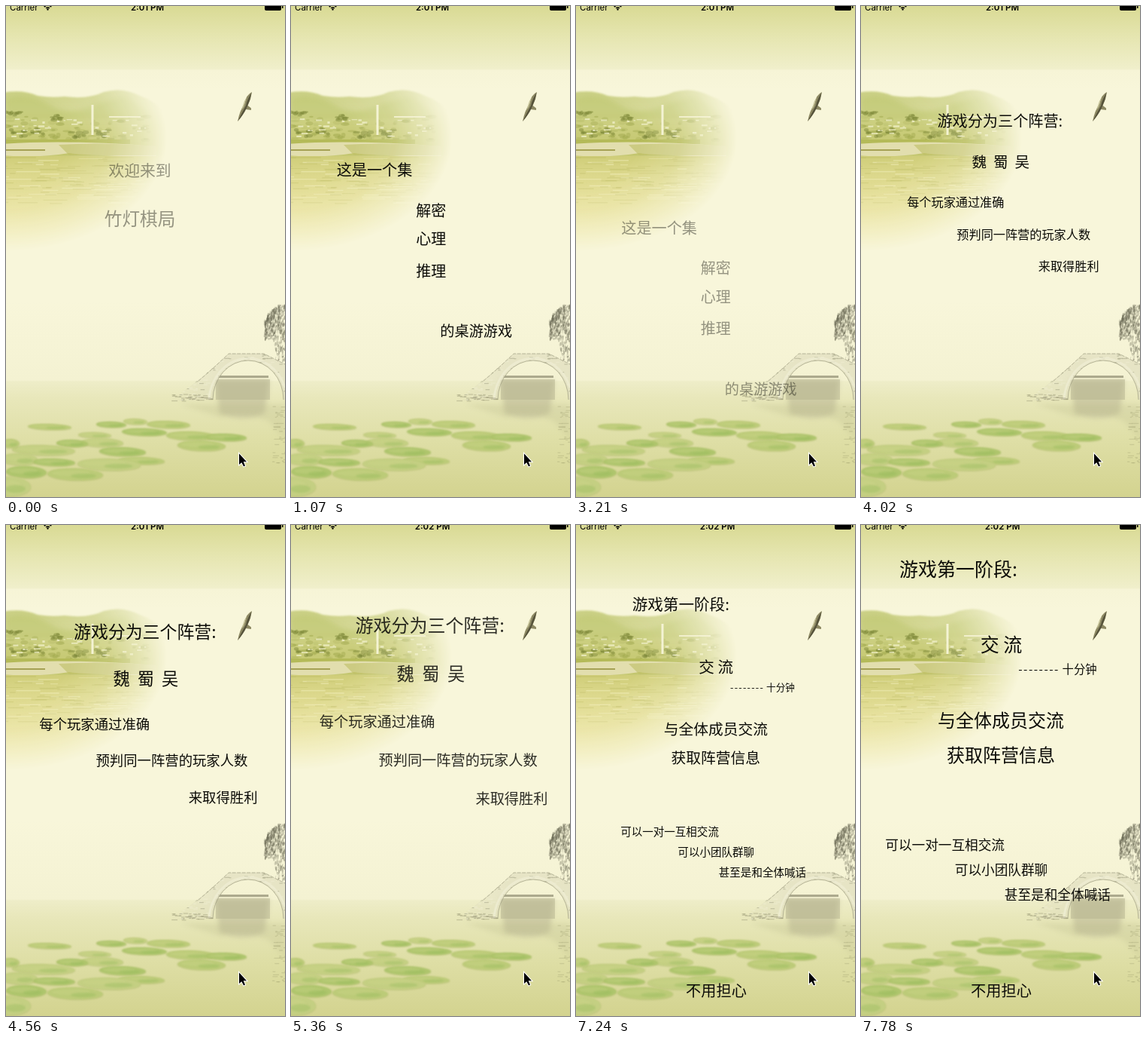
Write an HTML page with a canvas that moves like this. It is 371 px wide and 651 px high and loops after 8 s.

```html
<!DOCTYPE html>
<html lang="zh-CN">
<head>
<meta charset="utf-8">
<style>
html, body { margin: 0; width: 100%; height: 100%; overflow: hidden; background: #f8f6da; }
canvas { display: block; }
</style>
</head>
<body>
<canvas id="stage" width="371" height="651"></canvas>
<script>
const W = 371, H = 651, LOOP = 8000;
const CJK = '"Noto Sans CJK SC", "Noto Sans CJK", sans-serif';
const ctx = document.getElementById('stage').getContext('2d');

// Each line: text, size, x and y from the zoom centre, then options.
const CENTER = { x: 185, y: 324 };
const pages = [
  [
    ['欢迎来到', 26, -4, -132.5],
    ['竹灯棋局', 29.5, -4, -52.5]
  ],
  [
    ['这是一个集', 25.2, -93, -133],
    ['解密', 25, 1, -66],
    ['心理', 25, 1, -19],
    ['推理', 25, 1, 34],
    ['的桌游游戏', 24, 76, 134]
  ],
  [
    ['游戏分为三个阵营:', 25.2, -104.5, -200.5, { align: 'left' }],
    ['魏  蜀  吴', 24.5, 1, -132.7],
    ['每个玩家通过准确', 20.2, -74, -66],
    ['预判同一阵营的玩家人数', 20.2, 39, -12.5],
    ['来取得胜利', 20.2, 114, 40.5]
  ],
  [
    ['游戏第一阶段:', 25.2, -135, -267.5, { align: 'left' }],
    ['交 流', 25.2, 1.5, -166.5],
    ['--------', 15.5, 24.5, -133.5, { align: 'left', spacing: '1.5px' }],
    ['十分钟', 15.5, 106.5, -133.5],
    ['与全体成员交流', 24.2, 1, -65.5],
    ['获取阵营信息', 24.2, 1, -19],
    ['可以一对一互相交流', 17.8, -74, 101],
    ['可以小团队群聊', 17.8, 1.5, 134.5],
    ['甚至是和全体喊话', 17.8, 77, 167.5]
  ]
];

// Camera moves between neighbouring pages.
const moves = [
  { from: -70, to: 1095, dx: -410, dy: 0 },
  { from: 2916, to: 4130, dx: 0, dy: 552 },
  { from: 5880, to: 7120, dx: 705, dy: -171 }
];
const zoomIns = [1095, 4140, 7090], zoomOuts = [2150, 5100];

const ease = (t, from, to) => {
  const p = Math.min(1, Math.max(0, (t - from) / (to - from)));
  return (1 - Math.cos(Math.PI * p)) / 2;
};
const zoomPart = (t, start) => ease(t, start, start + 795);

function drawLine(text, size, x, y, { align = 'center', spacing = '0px' } = {}) {
  ctx.font = `${size}px ${CJK}`;
  ctx.textAlign = align;
  ctx.letterSpacing = spacing;
  ctx.fillText(text, x, y + size * 0.37);
}

function drawPage(index, x, y, scale, alpha) {
  ctx.save();
  ctx.globalAlpha = alpha;
  ctx.translate(CENTER.x + x, CENTER.y + y);
  ctx.scale(scale, scale);
  for (const line of pages[index]) drawLine(...line);
  ctx.restore();
}

function makeLayer(paint) {
  const canvas = document.createElement('canvas');
  canvas.width = W;
  canvas.height = H;
  paint(canvas.getContext('2d'));
  return canvas;
}

function makeRandom(seed) {
  return (lo = 0, hi = 1) => {
    seed = (seed * 16807) % 2147483647;
    return lo + (hi - lo) * seed / 2147483647;
  };
}

function vertical(g, y0, y1, ...stops) {
  const fill = g.createLinearGradient(0, y0, 0, y1);
  for (const [at, color] of stops) fill.addColorStop(at, color);
  return fill;
}

function oval(g, x, y, rx, ry, color, angle = 0) {
  g.fillStyle = color;
  g.beginPath();
  g.ellipse(x, y, rx, ry, angle, 0, 2 * Math.PI);
  g.fill();
}

function rect(g, color, ...box) {
  g.fillStyle = color;
  g.fillRect(...box);
}

function shape(g, path, color) {
  g.fillStyle = color;
  g.fill(new Path2D(path));
}

function paintLake(g) {
  const rnd = makeRandom(41);
  g.filter = 'blur(1px)';
  shape(g, 'M-5 115Q22 110 42 119Q60 122 78 120Q110 124 130 114Q155 107 178 119Q200 126 215 145V200H-5Z',
    vertical(g, 110, 190, [0, '#c9cf83'], [0.35, '#d3d692'], [0.6, '#cbce7e'], [1, '#c3c66e']));
  g.filter = 'blur(3px)';
  shape(g, 'M0 122Q30 114 55 130T110 134T160 120L190 140V150H0Z', 'rgba(188,198,108,.5)');
  g.filter = 'blur(0.6px)';
  for (let i = 0; i < 90; i++) {
    oval(g, rnd(0, 190), rnd(146, 180), rnd(2, 7), rnd(1, 3), `rgba(150,160,66,${rnd(0.1, 0.4)})`);
  }
  for (const [x, y] of [[10, 143], [72, 147], [42, 166], [95, 170], [16, 168], [130, 168]]) {
    for (let i = 0; i < 9; i++) {
      oval(g, x + rnd(-11, 11), y + rnd(-4, 5), rnd(2, 5), rnd(1, 3), 'rgba(122,134,54,.45)');
    }
  }
  rect(g, '#b4ba58', 0, 177, 165, 6);
  for (let i = 0; i < 34; i++) {
    rect(g, 'rgba(248,246,216,.65)', rnd(0, 185), rnd(149, 173), rnd(2, 9), rnd(1, 3));
  }
  rect(g, '#f3f2d2', 113.5, 131, 3, 40);
  rect(g, '#eeecc6', 137, 146, 42, 2);
  shape(g, 'M-5 183Q80 177 200 186V200Q100 198 84 195Q40 202 -5 198Z', '#e2deae');
  shape(g, 'M70 184Q130 180 200 186V198H84Z', 'rgba(190,190,100,.6)');
  rect(g, 'rgba(150,146,62,.8)', 0, 190, 52, 2);
  rect(g, vertical(g, 198, 330, [0, '#cfcd78'], [0.2, '#dcd88c'], [0.5, '#e6e09a'], [1, '#f0e9a8']), 0, 199, 230, 140);
  for (let i = 0; i < 110; i++) {
    rect(g, rnd() < 0.55 ? 'rgba(166,165,70,.2)' : 'rgba(250,247,206,.4)',
      rnd(-20, 180), rnd(199, 262), rnd(6, 40), rnd(0.7, 1.6));
  }
  // Fade towards the right and the bottom.
  g.filter = 'none';
  g.globalCompositeOperation = 'destination-in';
  g.setTransform(1, 0, 0, 0.7, 0, 175);
  const mask = g.createRadialGradient(0, 0, 0, 0, 0, 214);
  mask.addColorStop(0, '#000');
  mask.addColorStop(0.4, '#000');
  mask.addColorStop(0.65, 'rgba(0,0,0,.78)');
  mask.addColorStop(0.85, 'rgba(0,0,0,.36)');
  mask.addColorStop(1, 'transparent');
  g.fillStyle = mask;
  g.fillRect(0, -400, W, 1000);
}

function paintBridge(g) {
  const rnd = makeRandom(97);
  g.filter = 'blur(3px)';
  shape(g, 'M279 496H350L344 540Q315 552 284 540Z', 'rgba(192,190,152,.65)');
  shape(g, 'M232 528H371V575L352 552Q320 535 285 545Z', 'rgba(185,184,135,.25)');
  g.filter = 'blur(0.5px)';
  rect(g, 'rgba(180,178,142,.5)', 279, 495, 72, 27);
  rect(g, 'rgba(135,133,106,.65)', 282, 490, 67, 3);
  const wall = new Path2D('M218 524Q262 493 296 461H343L371 475V522H369A47 52 0 0 0 275 522Z');
  g.save();
  g.clip(wall);
  const fade = g.createLinearGradient(215, 0, 290, 0);
  fade.addColorStop(0, 'rgba(220,218,184,0)');
  fade.addColorStop(1, 'rgba(225,223,192,.75)');
  rect(g, fade, 210, 455, 161, 75);
  for (let i = 0; i < 210; i++) {
    rect(g, `rgba(${rnd() < 0.55 ? '150,148,120' : '244,242,218'},.45)`,
      rnd(228, 371), rnd(460, 523), rnd(2, 7), 1.2);
  }
  g.restore();
  g.strokeStyle = 'rgba(146,144,118,.6)';
  g.lineWidth = 1;
  g.stroke(new Path2D('M275 522A47 52 0 0 1 369 522'));
  g.setLineDash([5, 1.5]);
  g.stroke(new Path2D('M256 497Q274 482 296 461H343L371 475'));
  g.setLineDash([]);
  g.strokeStyle = 'rgba(240,238,213,.7)';
  g.lineWidth = 3;
  g.stroke(new Path2D('M270 522A52 58 0 0 1 371 506'));
  for (let i = 0; i < 26; i++) {
    rect(g, 'rgba(142,140,108,.4)', rnd(218, 270), rnd(514, 524), rnd(2, 9), 1.2);
  }
  for (let i = 0; i < 40; i++) {
    rect(g, 'rgba(140,141,96,.25)', 371 - rnd(0, 18), rnd(528, 606), rnd(2, 10), 1.2);
  }
  g.filter = 'none';
}

function paintWillow(g) {
  const rnd = makeRandom(13);
  for (let i = 0; i < 420; i++) {
    const x = rnd(344, 373);
    const top = 397 + (x - 367) ** 2 / 24;
    const bottom = x < 357 ? 442 : 470;
    const y = top + (bottom - top) * rnd() ** 1.5;
    oval(g, x + rnd(-1, 1), y, rnd(0.5, 1.3), rnd(1, 3.5), `rgba(112,111,90,${rnd(0.12, 0.5)})`, 0.15);
  }
}

function paintPads(g) {
  const pads = [
    [58, 558, 29, 4], [140, 555, 20, 4], [172, 551, 16, 4], [216, 555, 29, 5], [184, 565, 30, 5],
    [118, 569, 22, 4], [246, 570, 33, 6], [293, 572, 27, 5], [128, 579, 28, 6], [260, 583, 32, 7],
    [88, 580, 21, 5], [50, 589, 42, 7], [6, 580, 12, 6], [155, 591, 31, 6], [18, 601, 24, 8],
    [180, 603, 31, 5], [64, 605, 28, 5], [137, 608, 42, 8], [92, 621, 37, 8], [27, 618, 27, 8], [4, 637, 29, 13]
  ];
  const colors = ['#bccb78', '#aec56c', '#c4cf82'];
  g.filter = 'blur(0.8px)';
  pads.forEach(([x, y, rx, ry], i) => {
    oval(g, x, y + 0.8, rx, ry, 'rgba(160,172,92,.35)', 0.03);
    oval(g, x, y, rx, ry, colors[i % 3], 0.03);
    oval(g, x - rx * 0.15, y - ry * 0.2, rx * 0.7, ry * 0.45, 'rgba(205,216,139,.3)');
    oval(g, x + rx * 0.3, y + ry * 0.25, rx * 0.45, ry * 0.4, 'rgba(140,182,84,.3)');
  });
  g.filter = 'none';
}

function paintBird(g) {
  shape(g, 'M327 114Q319 118 317.5 129Q311 138 308 153Q314 146 318.5 137L326 138V135.5L321.5 132Q326 123 327 114Z', '#8d8963');
  shape(g, 'M326.5 115Q321 123 319 132L313 143L308 153Q316 144 320 135Q325 125 326.5 115Z', '#55523a');
  shape(g, 'M320 121L316 134L313 138L317 126Z', '#c5c297');
}

function paintStatus(g) {
  g.fillStyle = '#000';
  g.font = '11.5px Inter, sans-serif';
  g.fillText('Carrier', 5, 6);
  g.strokeStyle = '#000';
  g.lineWidth = 1.6;
  for (const r of [3, 6]) {
    g.beginPath();
    g.arc(55.5, 5, r, -Math.PI * 0.78, -Math.PI * 0.22);
    g.stroke();
  }
  oval(g, 55.5, 4.5, 1.2, 1.2, '#000');
  g.fillStyle = '#000';
  g.beginPath();
  g.roundRect(344, -5, 22, 11, 2);
  g.fill();
  rect(g, '#000', 367, -1, 1.5, 4);
}

const background = makeLayer(g => {
  rect(g, vertical(g, 0, H, [0, '#d9da94'], [0.06, '#e5e5af'], [0.128, '#f0efcb'], [0.131, '#f6f4d6'],
    [0.17, '#f8f6da'], [0.6, '#f8f6da'], [0.762, '#f4f2d2'], [0.765, '#eeedc8'], [0.8, '#e8e7ba'],
    [0.88, '#dfdfa7'], [1, '#d3d38f']), 0, 0, W, H);
  g.drawImage(makeLayer(paintLake), 0, 0);
  paintBridge(g);
  paintWillow(g);
  paintPads(g);
  paintBird(g);
  paintStatus(g);
});

const cursor = new Path2D('M310 593.5V608L313.3 605.2L316 610.5L318 609.5L315.7 604.3H320Z');

function render(t) {
  ctx.drawImage(background, 0, 0);
  ctx.fillStyle = '#000';
  ctx.textAlign = 'center';
  ctx.letterSpacing = '0px';
  ctx.font = '600 11.5px Inter, sans-serif';
  ctx.fillText(t < 5230 ? '2:01 PM' : '2:02 PM', 188, 6);

  ctx.fillStyle = '#0c0c08';
  let scale = 0.8;
  for (const start of zoomIns) scale += 0.2 * zoomPart(t, start);
  for (const start of zoomOuts) scale -= 0.2 * zoomPart(t, start);

  const index = moves.findLastIndex(move => t >= move.from);
  const { from, to, dx, dy } = moves[index];
  const p = ease(t, from, to);
  if (p < 1) drawPage(index, dx * p, dy * p, scale, 0.42);
  const dim = index < zoomOuts.length ? 0.58 * zoomPart(t, zoomOuts[index]) : 0;
  drawPage(index + 1, dx * (p - 1), dy * (p - 1), scale, 1 - dim);
  if (index === 2) drawLine('不用担心', 20.2, 186.5 + dx * (p - 1), 618 + dy * (p - 1));

  ctx.strokeStyle = '#fff';
  ctx.lineWidth = 2;
  ctx.stroke(cursor);
  ctx.fillStyle = '#000';
  ctx.fill(cursor);
}

const began = performance.now();
function tick() {
  render((performance.now() - began) % LOOP);
  requestAnimationFrame(tick);
}
tick();
</script>
</body>
</html>
```
